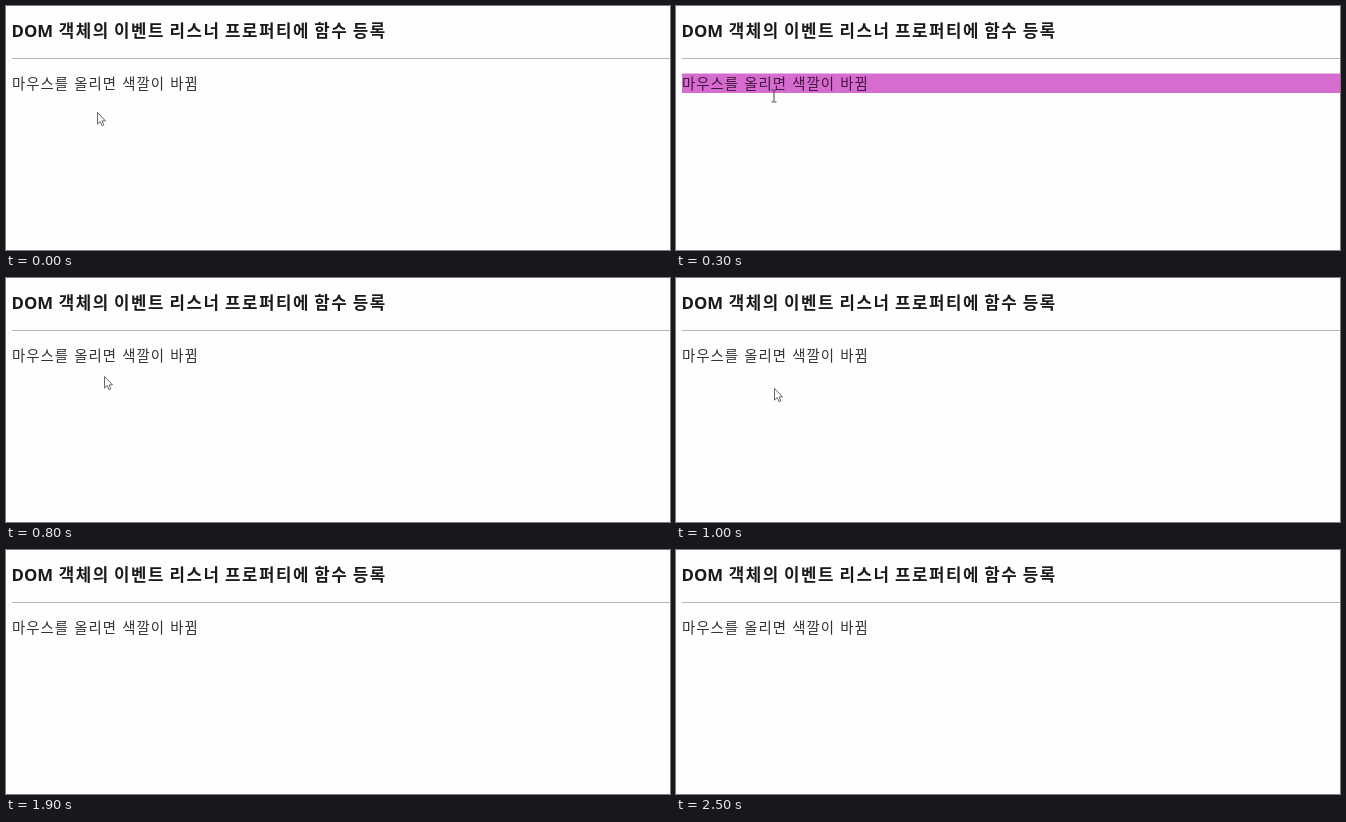
An HTML page for the animation above (3000 ms loop, 664 by 244 pixels).

```html
<!DOCTYPE html>
<html lang="ko">
<head>
<meta charset="utf-8">
<style>
  html, body { margin: 0; width: 100%; height: 100%; overflow: hidden; background: #fefefe; }
  svg { display: block; width: 664px; height: 244px; }
  text { font-family: "Noto Sans CJK KR", "Noto Sans CJK", sans-serif; }
  .title { font-size: 16.8px; font-weight: 700; letter-spacing: 1.55px; word-spacing: -1.8px; fill: #1a1a1a; }
  .latin { font-family: "Open Sans", "Noto Sans", sans-serif; letter-spacing: 0; }
  .line { font-size: 14.4px; letter-spacing: 1.05px; }
</style>
</head>
<body>
<svg viewBox="0 0 664 244">
  <text class="title latin" x="5.5" y="30.5">DOM</text>
  <text class="title" x="52.7" y="30.5">객체의 이벤트 리스너 프로퍼티에 함수 등록</text>
  <rect x="6" y="52" width="658" height="1" fill="#b5b5b5"/>
  <rect id="band" x="6" y="67.5" width="658" height="19.5" fill="#d66cd0"/>
  <text id="line" class="line" x="6" y="82.5">마우스를 올리면 색깔이 바뀜</text>
  <path id="arrow" d="M0 0V11.6L2.7 9L4.5 13.2L6.3 12.4L4.6 8.4H8Z" fill="#fff" stroke="#666" stroke-linejoin="round"/>
  <path id="beam" d="M-2.5 -6H-.5L0 -5.5L.5 -6H2.5M0 -5.5V5.5M-2.5 6H-.5L0 5.5L.5 6H2.5" fill="none" stroke="#4a3a4a"/>
</svg>
<script>
const LOOP = 3000;
const [band, line, arrow, beam] = ["band", "line", "arrow", "beam"].map(id => document.getElementById(id));

// start time, pointer kind, x, y
const pointer = [
  [0, arrow, 91.5, 106.5],
  [100, arrow, 95.5, 97.5],
  [200, beam, 97.5, 91],
  [300, beam, 98, 90],
  [800, arrow, 98.5, 98.5],
  [900, arrow, 98.5, 105.5],
  [1000, arrow, 98.5, 110.5],
  [1100, arrow, 98.5, 114.5],
  [1200, arrow, 99.5, 118.5],
  [1300, arrow, 100.5, 127.5],
  [1400, arrow, 101.5, 135.5],
  [1700, arrow, 589.5, 179.5],
  [1800, null, 0, 0]
];

const show = (el, on) => el.setAttribute("visibility", on ? "visible" : "hidden");

function draw(t) {
  const hover = (t >= 200 && t < 800) || (t >= 2200 && t < 2300);
  show(band, hover);
  line.setAttribute("fill", hover ? "#40163e" : "#333");

  const [, kind, x, y] = pointer.filter(p => p[0] <= t).pop();
  show(arrow, kind === arrow);
  show(beam, kind === beam);
  if (kind) kind.setAttribute("transform", `translate(${x} ${y})`);
}

const start = performance.now();
function tick() {
  draw((performance.now() - start) % LOOP);
  requestAnimationFrame(tick);
}
tick();
</script>
</body>
</html>
```
